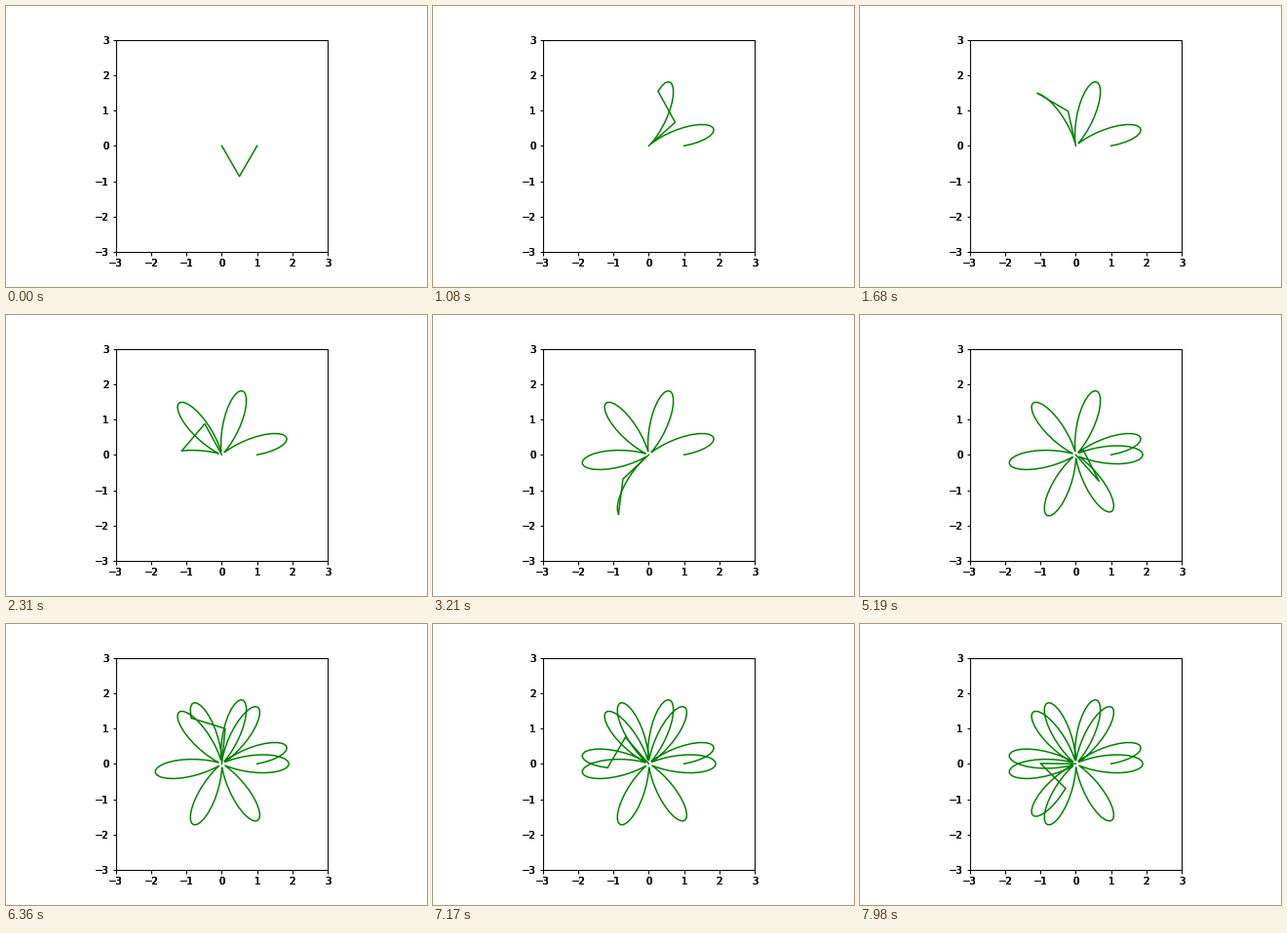
Animation of 432 by 288 pixels, one loop 8000 ms. Source, as a matplotlib script:

```python
import matplotlib.pyplot as plt
import numpy as np
from matplotlib.animation import FuncAnimation

LOOP_MS = 8000
INTERVAL = 20
STEP_MS = 30
LABEL_PASSES = 5  # repeated passes give the labels their heavy edges

plt.rcParams["font.family"] = "DejaVu Sans"
plt.rcParams["font.size"] = 10

fig, ax = plt.subplots(figsize=(6, 4), dpi=72)
fig.subplots_adjust(left=0.125, right=0.9, bottom=0.125, top=0.88)
ax.set(xlim=(-3, 3), ylim=(-3, 3), aspect="equal")
ax.spines[:].set_linewidth(1)

ticks = range(-3, 4)
ax.set_xticks(ticks, labels=[])
ax.set_yticks(ticks, labels=[])
ax.tick_params(width=1, length=3.5)


def add_labels():
    x_trans, x_va, x_ha = ax.get_xaxis_text1_transform(7)
    y_trans, y_va, y_ha = ax.get_yaxis_text1_transform(7)
    for v in ticks:
        label = str(v).replace("-", "\u2212")
        for _ in range(LABEL_PASSES):
            ax.text(v, 0, label, transform=x_trans, va=x_va, ha=x_ha)
            ax.text(0, v, label, transform=y_trans, va=y_va, ha=y_ha)


def tip_polar(n):
    """Distance and angle of the arm's tip at step n."""
    return 1 + 0.9 * np.sin(0.25 * n), 0.04 * n


def to_xy(r, angle):
    return r * np.cos(angle), r * np.sin(angle)


add_labels()
trail, = ax.plot([], [], color="green", lw=1.5)
arm, = ax.plot([], [], color="green", lw=1.5)


def update(frame):
    mid = frame * INTERVAL + INTERVAL // 2
    step = max(mid // STEP_MS - 1, 0)
    r, angle = tip_polar(np.arange(step + 1))
    x, y = to_xy(r, angle)
    trail.set_data(x, y)

    # Two unit links, elbow on the clockwise side
    elbow_x, elbow_y = to_xy(1, angle[-1] - np.arccos(r[-1] / 2))
    arm.set_data([0, elbow_x, x[-1]], [0, elbow_y, y[-1]])
    return trail, arm


anim = FuncAnimation(fig, update, frames=LOOP_MS // INTERVAL,
                     interval=INTERVAL, repeat=True, repeat_delay=0)
plt.show()
```
